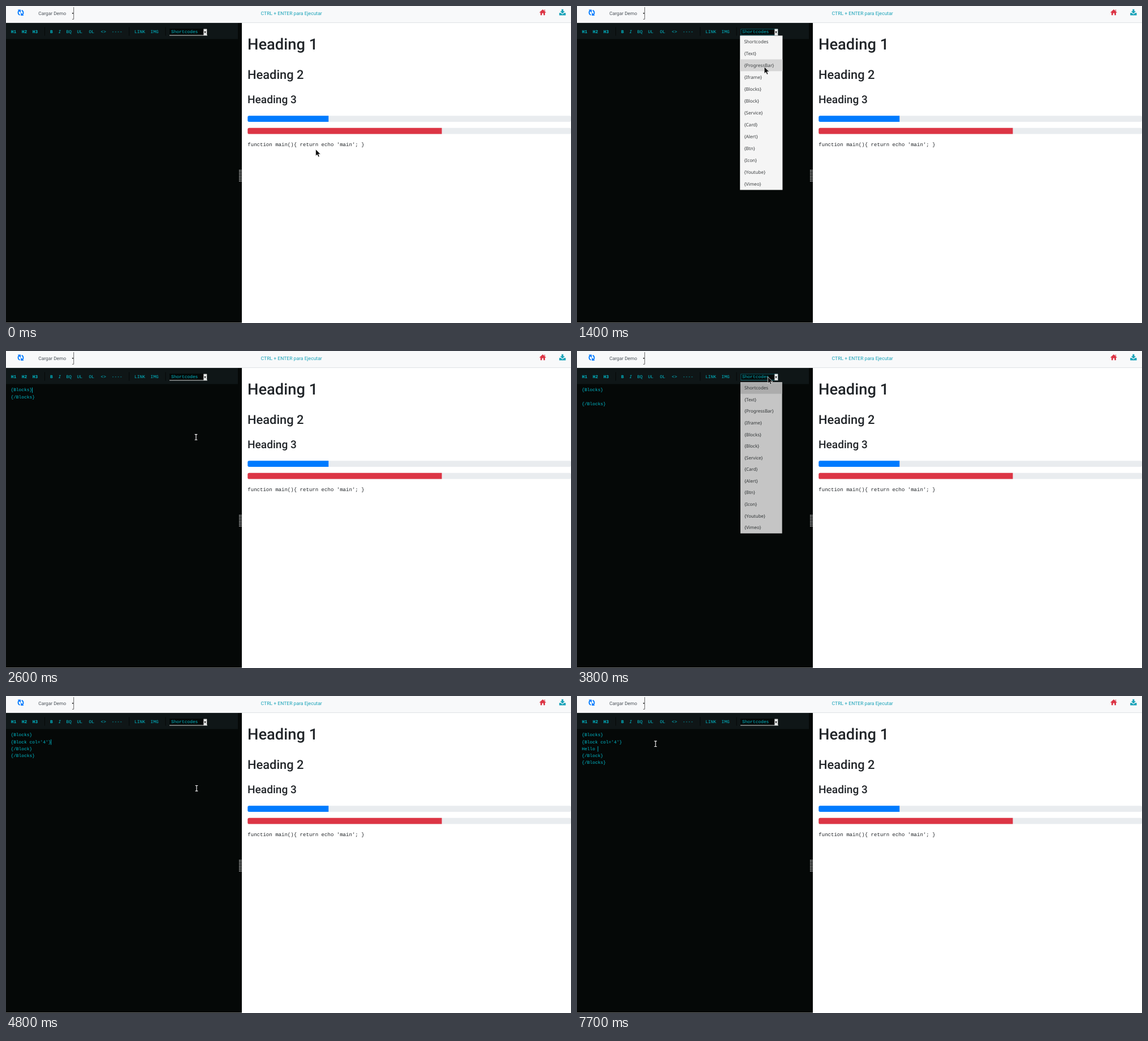
An HTML page that plays this animation: 999x561 px, repeating every 8 s.

```html
<!DOCTYPE html>
<html lang="es">
<head>
<meta charset="utf-8">
<title>Editor</title>
<style>
html, body { margin: 0; width: 100%; height: 100%; overflow: hidden; background: #fff; }
svg { display: block; width: 100%; height: 100%; }
text { white-space: pre; text-rendering: geometricPrecision; }
.mono { font: 7.9px "Liberation Mono", monospace; fill: #00bbcb; }
.ui { font: 8.6px Roboto, sans-serif; }
.head { font-family: Roboto, sans-serif; font-weight: 500; fill: #212529; }
.menu { font: 8.15px "Noto Sans", sans-serif; fill: #3c3f41; }
</style>
</head>
<body>
<svg id="stage" viewBox="0 0 999 561">
  <rect width="999" height="561" fill="#fff"/>
  <rect width="999" height="30" fill="#f8f9fa"/>
  <rect y="29" width="999" height="1" fill="#dfe2e5"/>

  <g fill="none" stroke="#007bff" stroke-width="1.8">
    <path d="M24.6 7.6H23.9A4.6 4.6 0 0 0 24.6 16"/>
    <path d="M27.6 15.8H28.3A4.6 4.6 0 0 0 27.6 7.6"/>
  </g>
  <path d="M20.6 6.6H26V12ZM31.6 16.9H26.2V11.5Z" fill="#007bff"/>
  <text class="ui" x="57.2" y="16.4" style="font-size:8.4px" fill="#495057">Cargar Demo</text>
  <path d="M119.7 2V23.4H117" fill="none" stroke="#666"/>
  <path d="M116.6 12H119.4L118 14.6Z" fill="#222"/>
  <text class="ui" x="450.6" y="15.7" fill="#17a2b8">CTRL + ENTER para Ejecutar</text>
  <path d="M949 6L954.8 11.2 954 12.1 953 11.3V16.2H950.3V12.8H947.7V16.2H945V11.3L944 12.1 943.2 11.2ZM951.8 6.6H953.2V9L951.8 7.8Z" fill="#dc3545"/>
  <g fill="#17a2b8">
    <path d="M982.4 5.8H985.4V9.3H988L983.9 13.4 979.8 9.3H982.4Z"/>
    <path d="M978.2 12.2H980.8L983.9 14.8 987 12.2H989.6V16.6H978.2Z"/>
  </g>

  <rect y="30" width="417" height="530.6" fill="#050807"/>
  <rect y="30" width="410" height="28.5" fill="#0f1617"/>
  <g id="tools"></g>
  <g id="select">
    <rect x="289" y="40" width="67" height="12.4" fill="#050908"/>
    <path id="line" d="M289 51.9H356" stroke="#d6dada"/>
    <rect id="focus" x="289.8" y="40.9" width="65" height="10.4" fill="none" stroke="#0c6670" stroke-width=".9"/>
    <rect x="349.3" y="40.6" width="6" height="11.4" fill="#e4e6e6"/>
    <path d="M350.4 45H353.6L352 48.4Z" fill="#111"/>
    <text class="mono" x="292" y="48.1">Shortcodes</text>
  </g>
  <g id="grip" fill="#d8d8d8"></g>
  <g id="lines"></g>
  <rect id="caret" width=".9" height="9.6" fill="#00bbcb"/>

  <text class="head" x="427" y="77.4" font-size="27.3">Heading 1</text>
  <text class="head" x="427" y="129.3" font-size="21.85">Heading 2</text>
  <text class="head" x="427" y="172" font-size="19.1">Heading 3</text>
  <g id="bars"></g>
  <text x="427.3" y="247.8" fill="#212529" style="font:9.05px 'Liberation Mono',monospace">function main(){ return echo 'main'; }</text>

  <g id="menu">
    <rect x="288.2" y="52.4" width="75.2" height="273.1" fill="#f5f5f5"/>
    <rect id="hover" x="288.2" width="75.2" height="21" fill="#d6d6d6"/>
  </g>
  <path id="arrow" d="M0 0V12L2.8 9.5 4.7 13.7 6.8 12.8 5 8.7H8.8Z" fill="#111" stroke="#fff" stroke-width=".7"/>
  <g id="beam" fill="none">
    <path d="M-2.4 -4.8H2.4M-2.4 4.8H2.4M0 -4.8V4.8" stroke="#111" stroke-width="2.2"/>
    <path d="M-2.3 -4.8H2.3M-2.3 4.8H2.3M0 -4.8V4.8" stroke="#f4f4f4" stroke-width="1.1"/>
  </g>
</svg>
<script>
const LOOP = 8000, STEP = 100;
const ROW = 21, MENU_TOP = 52.4, CHAR = 4.74, LINE = 12.2;
const $ = id => document.getElementById(id);

function add(parent, tag, attrs, content) {
  const el = document.createElementNS("http://www.w3.org/2000/svg", tag);
  for (const k in attrs) el.setAttribute(k, attrs[k]);
  if (content !== undefined) el.textContent = content;
  parent.append(el);
  return el;
}

const tools = [
  ["H1", 8.8, "bold"], ["H2", 27.8, "bold"], ["H3", 46.8, "bold"], ["B", 78, "bold"],
  ["I", 92.5, "italic"], ["BQ", 106.6], ["UL", 125.4], ["OL", 146.5], ["<>", 167.4],
  ["----", 186.8], ["LINK", 227], ["IMG", 255.5]
];
for (const [label, x, style = "normal"] of tools)
  add($("tools"), "text", { class: "mono", x, y: 48.1, style: `font-${style === "bold" ? "weight" : "style"}:${style}` }, label);
for (const x of [68, 217.3, 281.6])
  add($("tools"), "rect", { x, y: 37.5, width: 1, height: 15, fill: "#050808" });

for (let i = 0; i < 8; i++)
  for (const x of [412, 414.6])
    add($("grip"), "rect", { x, y: 290 + i * 2.75, width: 1.7, height: 1.3 });

function bar(y, width, color) {
  add($("bars"), "rect", { x: 427.3, y, width: 571.7, height: 10.8, rx: 2.7, fill: "#e9ecef" });
  add($("bars"), "path", { d: `M${427.3 + width} ${y}v10.8H430a2.7 2.7 0 0 1-2.7-2.7v-5.4a2.7 2.7 0 0 1 2.7-2.7Z`, fill: color });
}
bar(194.2, 143, "#007bff");
bar(215.8, 343.3, "#dc3545");

const items = "Text ProgressBar Iframe Blocks Block Service Card Alert Btn Icon Youtube Vimeo".split(" ").map(s => `{${s}}`);
["Shortcodes", ...items].forEach((s, i) =>
  add($("menu"), "text", { class: "menu", x: 295.4, y: MENU_TOP + ROW * (i + .5) + 2.9 }, s));

const rows = Array.from({ length: 5 }, (_, i) =>
  add($("lines"), "text", { class: "mono", x: 8.4, y: 71.4 + LINE * i }));

// [time, x, y]
const track = [
  [0, 547.5, 253.5], [800, 322, 45], [900, 322, 45.5], [1000, 321.5, 51.5], [1800, 340.7, 163.7],
  [2000, 340.7, 163.7], [2200, 336, 152.4], [2600, 336, 152.4], [3400, 332, 51.3],
  [3500, 337.3, 45.6], [3800, 337.3, 45.6], [4500, 337, 163.3], [4900, 337, 163.3],
  [5500, 138.9, 84.7], [LOOP, 138.9, 84.7]
];

const OPEN = "{Blocks}", CLOSE = "{/Blocks}", BLOCK = "{Block col='4'}";
const hello = s => [OPEN, BLOCK, s, "{/Block}", CLOSE];
// [time, lines, caret row (-1 hides it), caret column]
const edits = [
  [0, [], -1, 0],
  [2600, [OPEN, CLOSE], 0, 8],
  [3000, [OPEN, "", CLOSE], 1, 0],
  [3700, [OPEN, "", CLOSE], -1, 0],
  [4800, [OPEN, BLOCK, "{/Block}", CLOSE], 1, 15],
  [5700, hello(""), 2, 0],
  [6000, hello(""), -1, 0],
  ...[6800, 7100, 7200, 7400, 7600, 7700].map((t, i) => [t, hello("Hello ".slice(0, i + 1)), 2, i + 1])
];

// focus time, opening time, closing time, first opacity
const menus = [[900, 1000, 2600, .88], [3700, 3800, 4800, .8]];

function pointer(t) {
  const i = track.findIndex(k => k[0] > t);
  const [t0, x0, y0] = track[i - 1], [t1, x1, y1] = track[i];
  const p = (t - t0) / (t1 - t0);
  return [x0 + (x1 - x0) * p, y0 + (y1 - y0) * p];
}

const show = (id, on) => $(id).setAttribute("visibility", on ? "visible" : "hidden");

function draw(t) {
  const [x, y] = pointer(t);
  const menu = menus.find(m => t >= m[0] && t < m[2]);
  const open = !!menu && t >= menu[1];

  show("focus", menu);
  $("line").setAttribute("stroke", menu ? "#35494c" : "#d6dada");
  $("menu").style.display = open ? "" : "none";
  if (open) {
    const p = t < menu[1] + STEP ? menu[3] : 1;
    $("menu").setAttribute("opacity", p);
    $("menu").setAttribute("transform", `translate(325.8 189) scale(${.9 + .1 * p}) translate(-325.8 -189)`);
    const row = Math.max(0, Math.floor((y - MENU_TOP) / ROW));
    $("hover").setAttribute("y", MENU_TOP + ROW * row);
  }

  const [, lines, row, col] = edits.filter(e => e[0] <= t).pop();
  rows.forEach((el, i) => { el.textContent = lines[i] || ""; });
  show("caret", row >= 0);
  $("caret").setAttribute("x", 8.1 + CHAR * col);
  $("caret").setAttribute("y", 64.6 + LINE * Math.max(row, 0));

  const beam = !open && x < 410 && y > 59;
  show("beam", beam);
  show("arrow", !beam);
  $(beam ? "beam" : "arrow").setAttribute("transform", `translate(${x} ${y})`);
}

const start = performance.now();
function tick() {
  const t = (performance.now() - start) % LOOP;
  draw(Math.floor(t / STEP) * STEP);
  requestAnimationFrame(tick);
}
tick();
</script>
</body>
</html>
```
